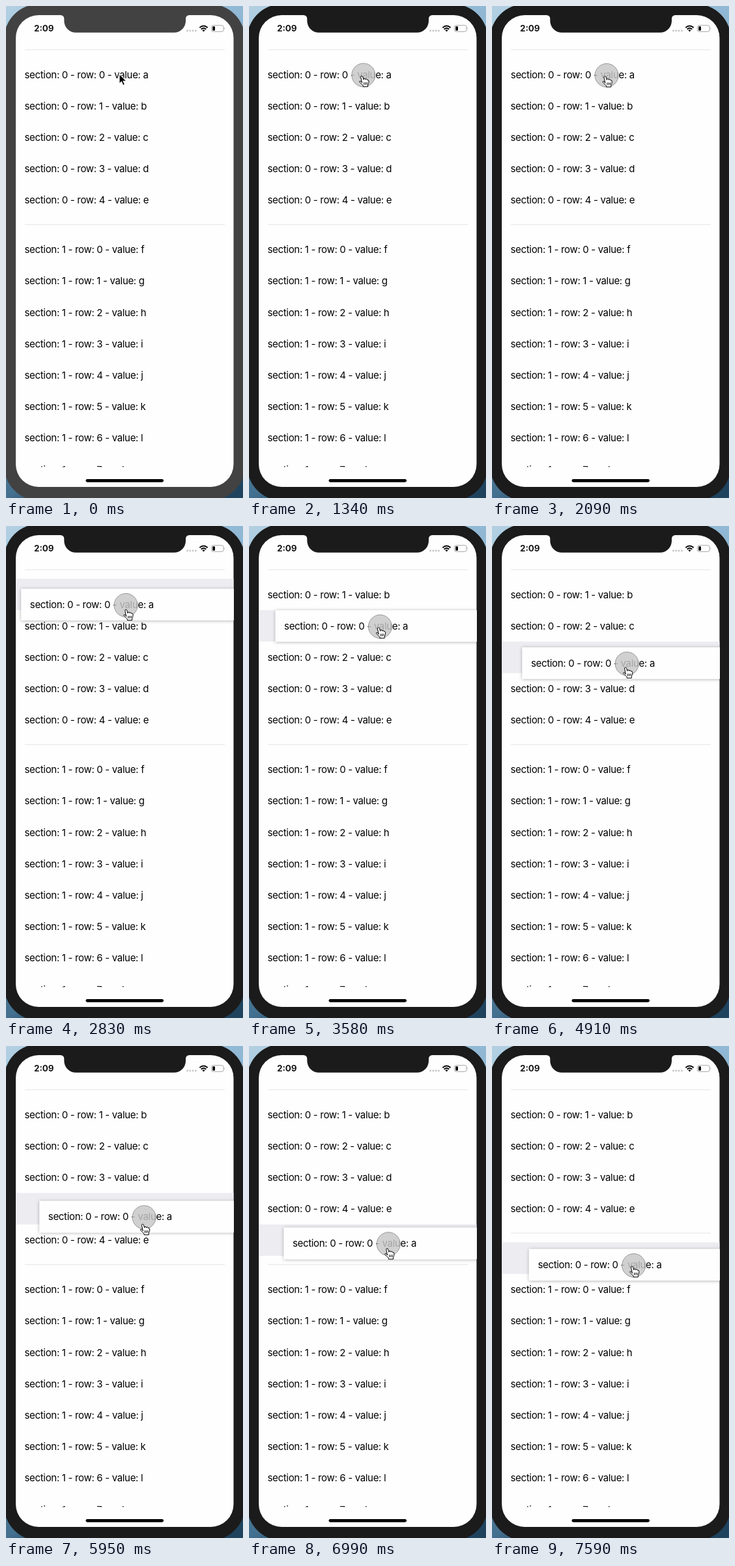
Animation of 364x755 px, one loop 8000 ms. Source, as an HTML page:

```html
<!DOCTYPE html>
<html lang="en">
<head>
<meta charset="utf-8">
<style>
  html, body { margin: 0; width: 100%; height: 100%; overflow: hidden; }
  svg { display: block; width: 364px; height: 755px; }
  text { font-family: Inter, "Liberation Sans", sans-serif; }
  .row { font-size: 15px; letter-spacing: -0.32px; }
  .clock { font-size: 13.6px; font-weight: 600; }
  .line { stroke: #e4e4e6; stroke-width: 1; }
</style>
</head>
<body>
<svg viewBox="0 0 364 755">
  <defs>
    <linearGradient id="sky" x2=".25" y2="1">
      <stop offset="0" stop-color="#b5d0e0"/>
      <stop offset=".06" stop-color="#a4cbe6"/>
      <stop offset=".94" stop-color="#44708f"/>
      <stop offset="1" stop-color="#1f435d"/>
    </linearGradient>
    <clipPath id="screen"><rect x="15" y="14" width="334.5" height="724" rx="35"/></clipPath>
    <clipPath id="list"><rect x="15" y="14" width="335" height="693.5"/></clipPath>
    <filter id="shadow" x="-10%" y="-40%" width="120%" height="180%">
      <feDropShadow dx="0" dy=".6" stdDeviation="2.5" flood-opacity=".32"/>
    </filter>
  </defs>
  <rect width="364" height="755" fill="url(#sky)"/>
  <rect id="bezel" x="-3" y="-3" width="370" height="762" rx="54"/>
  <g clip-path="url(#screen)">
    <rect x="15" y="14" width="335" height="724" fill="#fefefe"/>
    <g id="rows" clip-path="url(#list)">
      <rect id="slot" x="15" width="335" height="48.2" fill="#edecf1"/>
      <path class="line" d="M29 67H336"/>
      <path id="divider" class="line" d="M29 0H336"/>
    </g>
  </g>
  <g clip-path="url(#list)">
    <g id="dragged">
      <rect id="card" x="15" y="80.9" width="350" height="48.4" fill="#fefefe" filter="url(#shadow)"/>
      <text class="row" x="28.5" y="110.6">section: 0 - row: 0 - value: a</text>
    </g>
  </g>
  <path id="notch" d="M83.9 13V14A5.4 5.4 0 0 1 89.3 19.4V22.9A17.9 17.9 0 0 0 107.2 40.8H258.1A17.9 17.9 0 0 0 276 22.9V19.4A5.4 5.4 0 0 1 281.4 14V13Z"/>
  <text class="clock" x="43" y="39.2">2:09</text>
  <path d="M278.5 38H292" stroke="#c4c4c4" stroke-width="2.8" stroke-linecap="round" stroke-dasharray="0 4.3"/>
  <path d="M297.4 33.2Q303.5 27.7 309.6 33.2M299.7 35.7Q303.5 32.3 307.3 35.7" fill="none" stroke="#000" stroke-width="2"/>
  <path d="M301.4 37.2Q303.5 35.5 305.6 37.2L303.5 39.5Z"/>
  <rect x="315.5" y="29.7" width="18.6" height="9.6" rx="2.7" fill="none" stroke="#a5a5a5"/>
  <rect x="317.2" y="31.3" width="3.8" height="6.4" rx="1"/>
  <path d="M335.3 32.8Q337 34.5 335.3 36.3Z" fill="#a5a5a5"/>
  <rect x="122.5" y="726" width="119.5" height="4.7" rx="2.35"/>
  <circle id="touch" cx="175.8" cy="106" r="18" fill="#c7c7c7" fill-opacity=".83" stroke="#999"/>
  <path id="arrow" d="M174 104V119.5L177.4 116.3L179.8 121.8L182.5 120.6L180.1 115.3H185Z" stroke="#fff" stroke-width="1.1"/>
  <g id="hand" stroke="#000" stroke-linejoin="round" stroke-linecap="round">
    <path fill="#fff" d="M173.5 117.5L171.8 109.5Q171.5 107.5 173 107.3Q174.3 107.2 174.8 109L176 113Q175.8 111.3 177.2 111.2Q178.7 111.1 179 113Q179.2 111.8 180.4 112Q181.7 112.3 181.7 113.6Q183.7 112.8 184 115Q184.3 118.5 182.5 121V123.8H175.3V122Q173 119.8 170.2 117Q169.2 115.6 170.5 115Q171.7 114.7 173.5 117.5Z"/>
    <path fill="none" d="M176.7 117.5V120.5M179 117.5V120.5M181.2 117.5V120"/>
  </g>
</svg>
<script>
const LOOP = 8000, STEP = 149, ROW = 48.2, SECTION_GAP = 27.6;
const $ = id => document.getElementById(id);
const clamp = v => Math.max(0, Math.min(1, v));
const ease = v => v * v * (3 - 2 * v);
const mix = (a, b, p) => a + (b - a) * p;
const move = (el, x, y) => el.setAttribute('transform', `translate(${x.toFixed(2)} ${y.toFixed(2)})`);
const show = (el, on) => el.style.display = on ? '' : 'none';

// each pull of the finger, shown in a few even steps, and where it ends
const pulls = [
  { start: 1790, steps: 3, x: 0.3, y: 0.4 },
  { start: 2540, steps: 8, x: 25.6, y: 48.3 },
  { start: 3870, steps: 5, x: 31, y: 104.5 },
  { start: 4760, steps: 2, x: 31.4, y: 105.3 },
  { start: 5055, steps: 4, x: 36, y: 150 },
  { start: 5950, steps: 4, x: 38, y: 194 },
  { start: 6990, steps: 5, x: 41.9, y: 230.7 }
];

function addRow(section, row, value) {
  const el = document.createElementNS('http://www.w3.org/2000/svg', 'text');
  el.setAttribute('class', 'row');
  el.setAttribute('x', 28.5);
  el.setAttribute('y', (section ? 379.1 : 110.6) + row * ROW);
  el.textContent = `section: ${section} - row: ${row} - value: ${value}`;
  $('rows').append(el);
  return el;
}
const neighbours = [...'bcde'].map((v, i) => addRow(0, i + 1, v));
[...'fghijklm'].forEach((v, i) => addRow(1, i, v));

function dragAt(t) {
  let x = 0, y = 0;
  for (const pull of pulls) {
    if (t < pull.start) break;
    const step = Math.floor((t - pull.start + 8) / STEP) + 1;
    const p = ease(clamp(step / pull.steps));
    x = mix(x, pull.x, p);
    y = mix(y, pull.y, p);
  }
  return { x, y };
}

// how far the i-th obstacle has given way to the dragged row
const roomFor = (i, y) => ease(clamp((y / ROW - i - 0.45) / 0.3));

function draw(t) {
  const pressed = t >= 1340, lifted = t >= 2540;
  const { x, y } = dragAt(t);
  const ahead = dragAt(t + STEP);
  const crossed = roomFor(4, y);
  const frame = pressed ? '#1b1b1b' : '#424242';
  let slotY = 81 + SECTION_GAP * crossed;

  neighbours.forEach((el, i) => {
    const shift = ROW * roomFor(i, y);
    move(el, 0, -shift);
    slotY += shift;
  });
  move($('slot'), 0, slotY);
  move($('divider'), 0, 335.3 - ROW * crossed);
  move($('dragged'), x, y);
  move($('touch'), x, y);
  // the pointer runs a little ahead of the touch mark
  move($('hand'), mix(x, ahead.x, 0.6), mix(y, ahead.y, 0.6));

  for (const id of ['bezel', 'notch']) $(id).setAttribute('fill', frame);
  for (const id of ['touch', 'hand']) show($(id), pressed);
  for (const id of ['card', 'slot']) show($(id), lifted);
  show($('arrow'), !pressed);
}

const begin = performance.now();
function tick() {
  draw((performance.now() - begin) % LOOP);
  requestAnimationFrame(tick);
}
tick();
</script>
</body>
</html>
```
